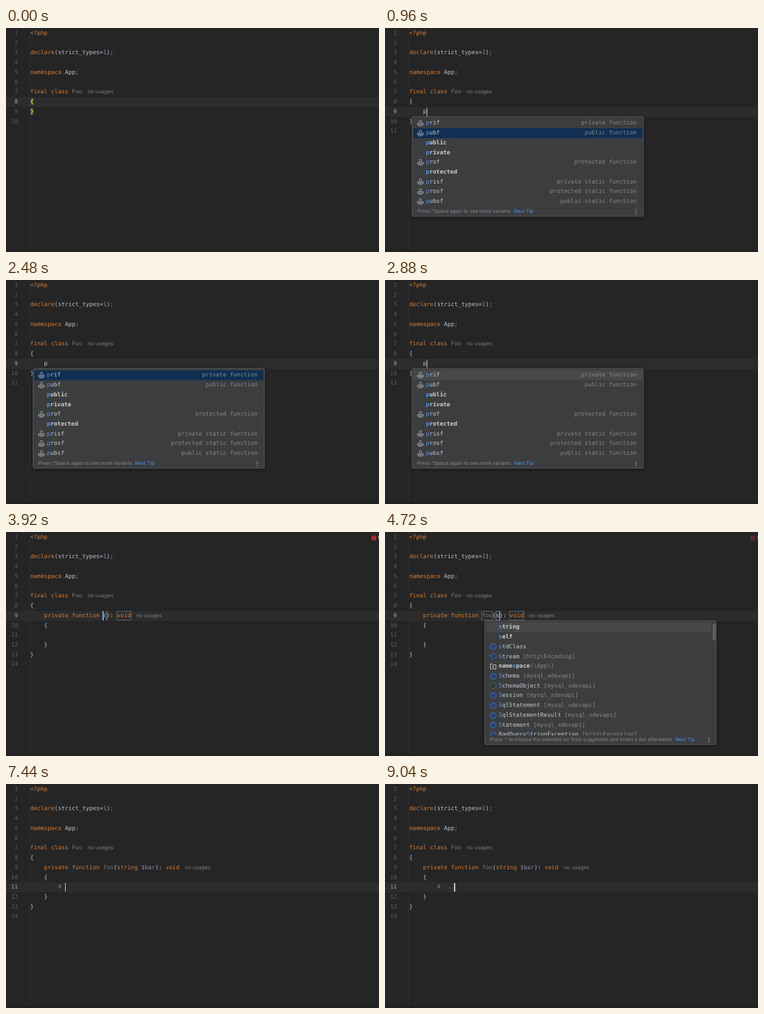
An HTML page for the animation above (9.12 s loop, 600 px wide and 360 px high).

```html
<!DOCTYPE html>
<html lang="en">
<head>
<meta charset="utf-8">
<title>Live templates</title>
<style>
html, body { margin: 0; width: 100%; height: 100%; overflow: hidden; background: #252526; }
#stage { position: relative; width: 600px; height: 360px; overflow: hidden; background: #252526;
  font: 9.27px/16px "DejaVu Sans Mono", monospace; color: #bac2cb; white-space: pre;
  text-rendering: geometricPrecision; }
#stage div, #stage svg { position: absolute; }
.gutter { left: 37.5px; top: 0; width: 1px; height: 360px; background: #2e2e2e; }
.foot { left: 0; bottom: 0; width: 600px; height: 4px; background: #212121; }
.now { left: 0; width: 600px; height: 15.7px; background: #2c2c2c; }
.line { left: 39px; height: 16px; }
.num { left: 0; width: 19px; text-align: right; font-size: 8.9px; color: #5d6062; }
.num.on { color: #a9aaab; }
.k { color: #d57c33; }
.n { color: #6897bb; }
.dim { color: #757677; }
.var { color: #9680aa; }
.brace { color: #f7d53a; background: #3a403a; font-weight: bold; }
.note { font: 8.5px/16px Inter, sans-serif; color: #7b7c7d; margin-left: 8.5px; }
.box { height: 14.5px; border: 1px solid #606263; box-sizing: border-box; }
.box.on { border-color: #5f86b5; }
.box.fill { background: #214283; border-color: #8fb2dc; }
.caret { width: 1.4px; height: 14px; background: #d0d0d0; }
.pop { top: 142.2px; width: 373px; background: #3b3d3f; border-radius: 4px;
  box-shadow: inset 0 0 0 1px #545658, 0 2px 6px #0004; overflow: hidden; }
.list { left: 0; top: 0; width: 100%; overflow: hidden; }
.row { left: 2.5px; right: 2px; height: 15.7px; line-height: 15.7px; }
.long .row { right: 8px; }
.row.soft { background: #47484a; }
.row.hard { background: #102f52; }
.row svg { left: 5.5px; top: 1.6px; }
.name { left: 20px; color: #c6c9cc; }
.name b { color: #cdcfd1; }
.name i { font-style: normal; color: #4f95ee; }
.tail { color: #85888a; }
.side { right: 9.5px; color: #85888a; }
.hint { left: 8.5px; bottom: 0.8px; font: 7.9px/16px Inter, sans-serif; color: #86898b; }
.hint i { font-style: normal; color: #4f95ee; margin-left: 4.8px; }
.dots { right: 11.8px; bottom: 4.2px; width: 1.4px; height: 1.4px; border-radius: 50%; background: #c3c5c7;
  box-shadow: 0 -3.2px #c3c5c7, 0 -6.4px #c3c5c7; }
.thumb { right: 1.5px; top: 5px; width: 5px; height: 27px; background: #5a5c5e; }
.err { left: 587px; top: 4.6px; }
.count { left: 597.5px; top: 1px; font: 8px/16px Inter, sans-serif; }
</style>
</head>
<body>
<div id="stage"></div>
<script>
const LOOP = 9120, BLINK = 490, CW = 5.58, LH = 15.73;
const stage = document.getElementById('stage');

const mid = n => 9 + (n - 1) * LH;
const col = c => 39 + c * CW;
const tag = (cls, text) => `<span class="${cls}">${text}</span>`;
const k = text => tag('k', text);
const div = (cls, style, html = '') => `<div class="${cls}" style="${style}">${html}</div>`;
const svg = (body, cls = '') => `<svg class="${cls}" width="12" height="12" viewBox="0 0 12 12">${body}</svg>`;
const note = tag('note', 'no usages');

const letter = (color, fill, ch, dash = '') => svg(
  `<circle cx="6" cy="6" r="4.6" fill="${fill}" stroke="${color}" stroke-width=".9" ${dash}/>
   <text x="6" y="8.3" font-size="6.4" text-anchor="middle" fill="${color}" font-family="Inter, sans-serif">${ch}</text>`);
const icons = {
  stamp: svg('<path d="M5 6.2C5 5 4 4.4 4 3.2a2 2 0 0 1 4 0C8 4.4 7 5 7 6.2M1.2 8.4V6.2h9.6v2.2zM2.6 10.2h6.8" fill="none" stroke="#b0b3b6" stroke-width=".9"/>'),
  cls: letter('#4a8fe6', '#25324d', 'C'),
  part: letter('#4a8fe6', '#25324d', 'C', 'stroke-dasharray="5 1.6"'),
  face: letter('#5f7562', '#2c352e', 'I'),
  space: svg('<path d="M1.5 10V2h3.2l1.2 1.5h4.6V10z" fill="none" stroke="#c3c6c9"/><circle cx="6" cy="6.8" r="1.2" fill="#c3c6c9"/>'),
  word: ''
};

// icon, name, description
const templates = [
  ['stamp', 'prif', 'private function'], ['stamp', 'pubf', 'public function'],
  ['word', 'public', ''], ['word', 'private', ''],
  ['stamp', 'prof', 'protected function'], ['word', 'protected', ''],
  ['stamp', 'prisf', 'private static function'], ['stamp', 'prosf', 'protected static function'],
  ['stamp', 'pubsf', 'public static function']
];
const dev = ' [mysql_xdevapi]';
const types = [
  ['word', 'string', ''], ['word', 'self', ''], ['cls', 'stdClass', ''],
  ['part', 'Stream', ' [http\\Encoding]'], ['space', 'namespace', '(\\App\\)'],
  ['cls', 'Schema', dev], ['face', 'SchemaObject', dev], ['cls', 'Session', dev],
  ['cls', 'SqlStatement', dev], ['cls', 'SqlStatementResult', dev], ['cls', 'Statement', dev],
  ['cls', 'BadQueryStringException', ' [http\\Exception]']
];

// time, change, true when the caret blink goes on undisturbed
const steps = [
  [0, { body: 0, typed: '', pop: '', sel: 0, hard: false, name: '', args: '', field: -1, err: 0, line: 8, at: -1 }],
  [80, { body: 1, line: 9, at: 4 }],
  [640, { typed: 'p', at: 5 }],
  [720, { pop: 'fn' }],
  ...[960, 1040, 1120, 1280, 1360, 1440, 1600, 1680].map((t, i) => [t, { sel: i + 1, hard: true }, true]),
  ...Array.from({ length: 8 }, (_, i) => [1840 + i * 80, { sel: 7 - i }, true]),
  [2560, { typed: '', pop: '', hard: false, at: 4 }],
  [2800, { typed: 'p', pop: 'fn', at: 5 }],
  [2960, { typed: 'pr', at: 6 }],
  [3120, { typed: 'pri', at: 7 }],
  [3200, { typed: 'prif', at: 8 }],
  [3520, { body: 2, pop: '', field: 0, at: 21 }],
  [3600, { err: 1 }, true],
  [4000, { name: 'f', at: 22 }],
  [4160, { name: 'fo', at: 23 }],
  [4320, { name: 'foo', at: 24 }],
  [4400, { err: 2 }, true],
  [4480, { field: 1, at: 25 }],
  [4560, { args: 's', at: 26 }],
  [4640, { pop: 'type' }],
  [5040, { args: 'string', pop: '', at: 31 }],
  [5120, { args: 'string ', at: 32 }],
  [5280, { args: 'string $', at: 33 }],
  [5440, { args: 'string $b', at: 34 }],
  [5520, { args: 'string $ba', at: 35 }],
  [5760, { args: 'string $bar', at: 36 }],
  [6000, { field: 2, at: 43 }],
  [6240, { err: 0 }, true],
  [6400, { field: -1, typed: '', line: 11, at: 8 }],
  [6480, {}],
  [7040, { typed: '#', at: 9 }],
  [7360, { typed: '# ', at: 10 }],
  [7600, { typed: '# .', at: 11 }],
  [7680, { typed: '# ..', at: 12 }],
  [7815, { typed: '# ...', at: 13 }]
];

function codeLines(s) {
  const brace = c => s.body ? c : tag('brace', c);
  const head = ['&lt;?php'].map(k).concat('',
    k('declare') + '(strict_types=' + tag('n', 1) + ')' + k(';'), '',
    k('namespace') + ' App' + k(';'), '',
    k('final class ') + tag('dim', 'Foo') + note, brace('{'));
  if (s.body === 0) return [...head, brace('}'), ''];
  if (s.body === 1) return [...head, '    ' + s.typed, '}', ''];
  const args = s.args.replace(/^string/, k).replace(/\$\w*/, v => tag('var', v));
  return [...head,
    '    ' + k('private function ') + tag('dim', s.name) + `(${args}): ` + k('void') + note,
    '    {', '        ' + tag('dim', s.line === 11 ? s.typed : ''), '    }', '}', ''];
}

function fieldBoxes(s) {
  if (s.field < 0) return '';
  const args = 22 + s.name.length, ret = args + s.args.length + 3;
  return [[21, s.name.length], [args, s.args.length], [ret, 4]].map(([c, len], i) =>
    div('box' + (i === s.field ? ' on' : '') + (i === 2 && s.field === 2 ? ' fill' : ''),
      `left:${col(c) - 0.8}px;top:${mid(9) - 7.4}px;width:${len * CW + 1.6}px`)).join('');
}

function nameHtml([icon, name], from, len) {
  const html = name.slice(0, from) + `<i>${name.slice(from, from + len)}</i>` + name.slice(from + len);
  return icon === 'word' || icon === 'space' ? `<b>${html}</b>` : html;
}

function popup(s) {
  if (!s.pop) return '';
  const long = s.pop === 'type';
  const rows = long ? types : templates.filter(r => r[1].startsWith(s.typed));
  const height = long ? 200 : rows.length * LH + 19.4;
  const list = rows.map((r, i) => {
    const from = long ? Math.max(0, r[1].search(/^s|^S|(?<=name)s|S(?=tringE)/)) : 0;
    const state = i === s.sel ? (s.hard ? ' hard' : ' soft') : '';
    return div('row' + state, `top:${3.15 + i * LH}px`, icons[r[0]] +
      div('name', '', nameHtml(r, from, long ? 1 : s.typed.length) + (long ? tag('tail', r[2]) : '')) +
      (long ? '' : div('side', '', r[2])));
  }).join('');
  const hint = long
    ? 'Press ^. to choose the selected (or first) suggestion and insert a dot afterwards'
    : 'Press ^Space again to see more variants';
  return div('pop' + (long ? ' long' : ''), `left:${long ? 160.3 : 43.3}px;height:${height}px`,
    div('list', `height:${height - 15}px`, list) +
    div('hint', '', `${hint}<i>Next Tip</i>`) + div('dots', '') + (long ? div('thumb', '') : ''));
}

function errorMark(s) {
  if (!s.err) return '';
  const [red, ink] = s.err === 1 ? ['#b3322b', '#c8c8c8'] : ['#622c29', '#6c6c6c'];
  return svg(`<circle cx="4.7" cy="4.7" r="4.1" fill="${red}"/><path d="M4.7 2.4v2.8M4.7 6.1v1.1" stroke="#2a2020"/>`, 'err') +
    div('count', `color:${ink}`, '1');
}

function draw(s) {
  stage.innerHTML =
    div('now', `top:${mid(s.line) - 7.85}px`) + div('gutter', '') + div('foot', '') + fieldBoxes(s) +
    codeLines(s).map((html, i) => {
      const top = `top:${mid(i + 1) - 8}px`;
      return div('num' + (i + 1 === s.line ? ' on' : ''), top, i + 1) + div('line', top, html);
    }).join('') +
    (s.at < 0 ? '' : div('caret', `left:${col(s.at) - 0.2}px;top:${mid(s.line) - 7.2}px`)) +
    popup(s) + errorMark(s);
}

const start = performance.now();
let shown = -1;
function tick() {
  const t = (performance.now() - start) % LOOP;
  let last = 0, base = 0;
  steps.forEach(([time, , keep], i) => {
    if (time > t) return;
    last = i;
    if (!keep) base = time;
  });
  if (last !== shown) {
    draw(Object.assign({}, ...steps.slice(0, last + 1).map(step => step[1])));
    shown = last;
  }
  const caret = stage.querySelector('.caret');
  if (caret) caret.style.opacity = Math.floor((t - base) / BLINK) % 2 ? 0 : 1;
  requestAnimationFrame(tick);
}
tick();
</script>
</body>
</html>
```
